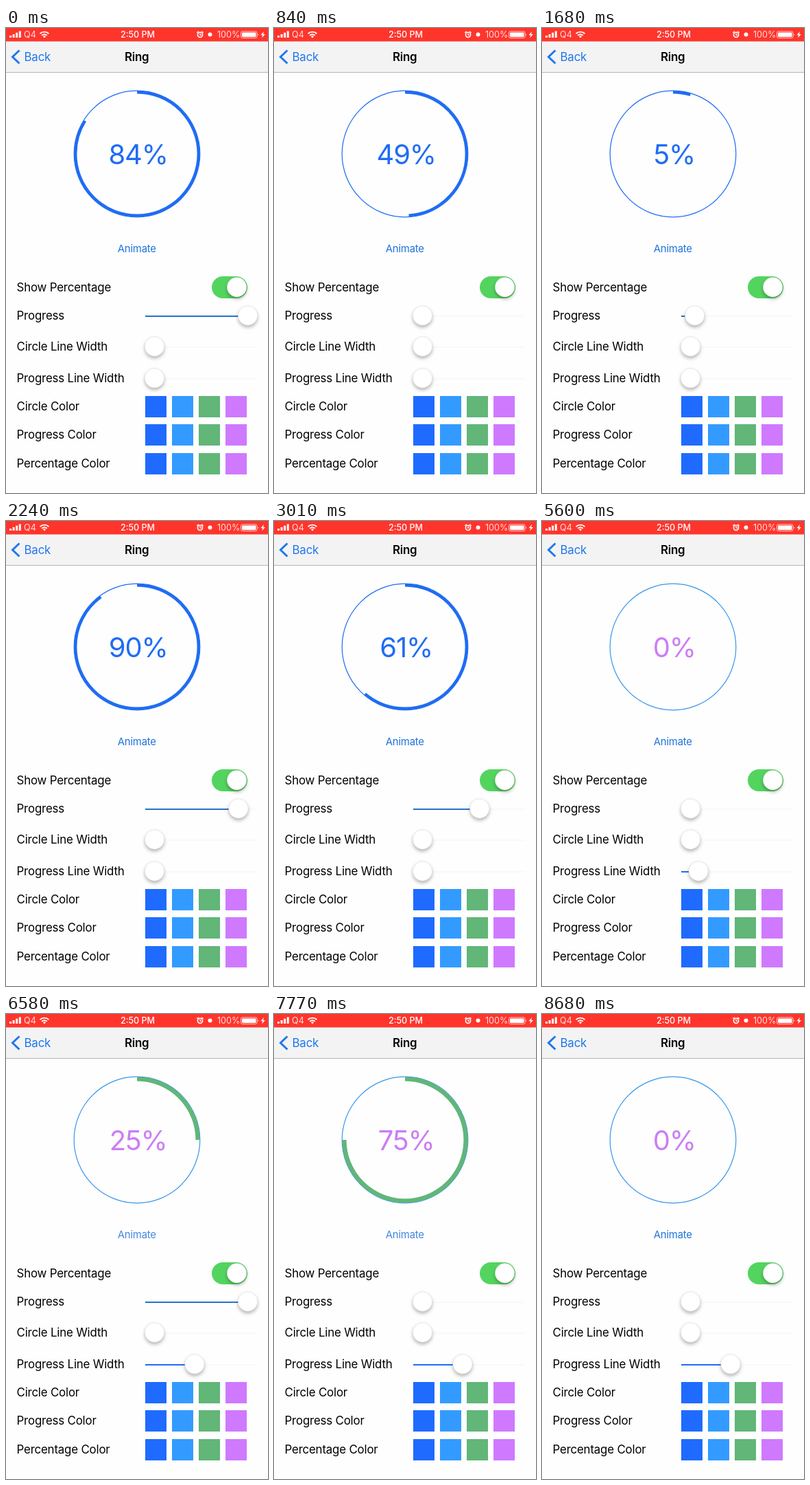
Animation, 382 px wide and 676 px high, one loop 8750 ms. Source, as an HTML page:

```html
<!DOCTYPE html>
<html lang="en">
<head>
<meta charset="utf-8">
<title>Ring</title>
<style>
  html, body { margin: 0; width: 100%; height: 100%; overflow: hidden; background: #fefefe; }
  svg { display: block; width: 382px; height: 676px; font: 16.9px Inter, "Liberation Sans", sans-serif; letter-spacing: -.2px; }
  .mid { text-anchor: middle; }
  .status { font-size: 12.6px; fill: #fff; letter-spacing: 0; }
  .soft { opacity: .85; }
  .knob { fill: #fff; stroke: #d2d2d2; stroke-width: .5; filter: drop-shadow(0 3px 2.5px rgba(0, 0, 0, .28)); }
  #percent { font-size: 40px; letter-spacing: -1.2px; }
</style>
</head>
<body>
<svg id="stage" viewBox="0 0 382 676">
  <rect width="382" height="676" fill="#fefefe"/>
  <rect y="19" width="382" height="45" fill="#f4f3f4"/>
  <rect y="64" width="382" height="1" fill="#b5b5b5"/>
  <rect width="382" height="19.5" fill="#ff352c"/>

  <g class="status">
    <path d="M5 11h3v3h-3zM9.6 9h3v5h-3zM14.2 6.8h3v7.2h-3zM18.8 4.5h3v9.5h-3z"/>
    <text class="soft" x="26" y="14">Q4</text>
    <g fill="none" stroke="#fff" stroke-width="1.9">
      <path d="M49.6 8.2a9.2 9.2 0 0 1 12.8 0M52.2 10.8a5.4 5.4 0 0 1 7.6 0"/>
    </g>
    <path d="M53.9 12.2a3 3 0 0 1 4.2 0l-2.1 2.2z"/>
    <text class="mid" x="192" y="14" font-weight="500">2:50 PM</text>
    <circle cx="283" cy="9.8" r="3.6" fill="none" stroke="#fff" stroke-width="1.6"/>
    <path d="M283 7.5v2.6h2M278.3 7l2.4-2.2M287.7 7l-2.4-2.2" fill="none" stroke="#fff" stroke-width="1.2"/>
    <circle cx="297.5" cy="9.5" r="3"/>
    <text class="soft" x="308" y="14">100%</text>
    <rect x="342.5" y="5" width="23.5" height="9.5" rx="2" fill="none" stroke="#fff" stroke-opacity=".7"/>
    <rect x="344" y="6.5" width="20.5" height="6.5" rx="1"/>
    <path d="M367.2 8.2q1.8 1.5 0 3zM376 5l-4.6 5.2h2.8l-1.2 4.3 4.8-5.6h-2.9z"/>
  </g>

  <path d="M19.5 32.5L9.5 42l10 9.5" fill="none" stroke="#1f78ee" stroke-width="3"/>
  <text x="26.5" y="48" fill="#1f78ee">Back</text>
  <text class="mid" x="190.7" y="48" font-weight="600">Ring</text>

  <circle id="circle" cx="191" cy="183" r="91.8" fill="none" stroke-width="1.2"/>
  <circle id="arc" cx="191" cy="183" fill="none" pathLength="100" transform="rotate(-90 191 183)"/>
  <text id="percent" class="mid" x="192.7" y="198"></text>
  <text id="animate" class="mid" x="190.8" y="326" fill="#1f74dc" style="font-size:14.9px">Animate</text>

  <rect x="300" y="361" width="52" height="32" rx="16" fill="#53d45f"/>
  <circle class="knob" cx="336.5" cy="376.7" r="14.2"/>
</svg>
<script>
const LOOP = 8750, STEP = 70;
const COLORS = ['#1f6bff', '#339bff', '#61b678', '#cf79ff'];
const [BLUE, SKY, GREEN, PURPLE] = ['#1f6cf4', '#3996ea', '#61b678', '#cb7df6'];
const stage = document.getElementById('stage');
const el = id => document.getElementById(id);

function add(tag, attrs, text = '') {
  const node = document.createElementNS('http://www.w3.org/2000/svg', tag);
  for (const key in attrs) node.setAttribute(key, attrs[key]);
  node.textContent = text;
  return stage.appendChild(node);
}

const label = (text, y) => add('text', { x: 15.5, y: y + 6 }, text);

function slider(text, y, color) {
  label(text, y);
  add('rect', { x: 216, y: y + .5, width: 149, height: 1, fill: '#f5f5f5' });
  const fill = add('rect', { x: 203, y, height: 2, fill: color });
  const knob = add('circle', { class: 'knob', cy: y, r: 14.2 });
  return value => {
    const x = 216.5 + 136 * value;
    fill.setAttribute('width', x - 203);
    knob.setAttribute('cx', x);
  };
}

function swatches(text, y) {
  label(text, y);
  COLORS.forEach((fill, i) =>
    add('rect', { x: 203 + 39 * i, y: y - 15, width: 31, height: 31, fill }));
}

label('Show Percentage', 376.5);
const setProgress = slider('Progress', 418, '#2474c8');
const setCircleWidth = slider('Circle Line Width', 463, BLUE);
const setArcWidth = slider('Progress Line Width', 509, BLUE);
swatches('Circle Color', 550);
swatches('Progress Color', 591);
swatches('Percentage Color', 633);

// Linear interpolation through [time, value] points.
function track(points, t) {
  const i = points.findIndex(p => p[0] > t);
  if (i < 0) return points[points.length - 1][1];
  if (i === 0) return points[0][1];
  const [t0, a] = points[i - 1], [t1, b] = points[i];
  return a + (b - a) * (t - t0) / (t1 - t0);
}

const TAPS = [330, 6330, 7520];
const DRAG = [[1650, 0], [2240, .9], [2400, 1], [2700, 1], [3500, 0]];
const RING = [[0, .84], [160, 1], [330, 1], [1330, 0], ...DRAG,
  [6330, 0], [7330, 1], [7520, 1], [8520, 0]];
const WIDTH = [[5500, 0], [6000, .43]];
const PRESS = [[-140, 1], [-70, .2], [0, .2], [310, 1]];

function draw(t) {
  const ring = track(RING, t), width = track(WIDTH, t);
  const full = t < TAPS[0] || (t >= TAPS[1] && t < TAPS[2]);
  setProgress(full ? 1 : track(DRAG, t));
  setCircleWidth(0);
  setArcWidth(width);

  const stroke = 4.1 + 5 * width, arc = el('arc');
  arc.setAttribute('r', 91.7 - stroke / 2);
  arc.setAttribute('stroke-width', stroke);
  arc.setAttribute('stroke', t < 4700 ? BLUE : GREEN);
  arc.setAttribute('stroke-dasharray', ring * 100 + ' 200');
  arc.setAttribute('visibility', ring > 0 ? 'visible' : 'hidden');
  el('circle').setAttribute('stroke', t < 4200 ? BLUE : SKY);

  const percent = el('percent');
  percent.textContent = Math.round(ring * 100) + '%';
  percent.setAttribute('fill', t < 5150 ? BLUE : PURPLE);
  el('animate').setAttribute('opacity', Math.min(...TAPS.map(tap => track(PRESS, t - tap))));
}

const start = performance.now();
function tick() {
  const t = (performance.now() - start) % LOOP;
  draw(Math.floor(t / STEP) * STEP);
  requestAnimationFrame(tick);
}
tick();
</script>
</body>
</html>
```
